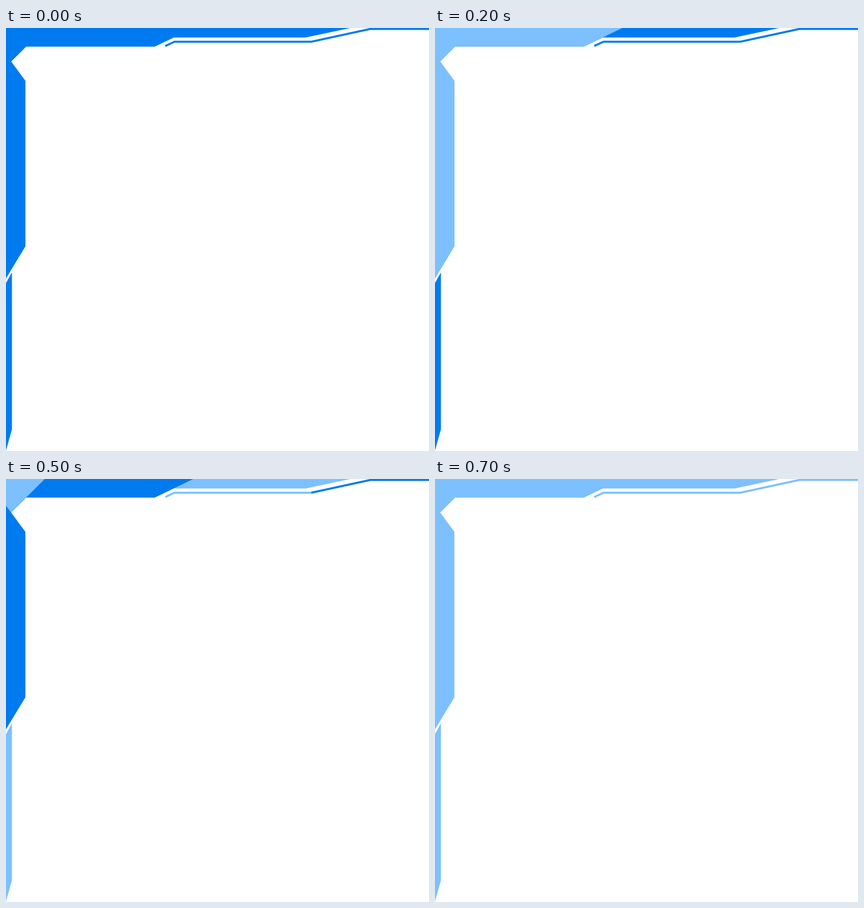
Recreate the animation shown at these times as an HTML page. Size 748 by 748 pixels, loop 800 ms.

```html
<!DOCTYPE html>
<html lang="en">
<head>
<meta charset="utf-8">
<title>Pulsing frame corner</title>
<style>
  html, body { margin: 0; width: 100%; height: 100%; overflow: hidden; background: #fff; }
  svg { display: block; width: 100%; height: 100%; }
</style>
</head>
<body>
<svg id="stage" viewBox="0 0 748 748">
  <clipPath id="frame">
    <path d="M0 0H609L530 16.8H296.8L263.4 32.8H35.6L9 59.3L34.2 93.5V386L0 442.5Z
             M0 451L10.5 432V709.5L0 747Z"/>
  </clipPath>
  <!-- Nested zones, outermost first; the clip gives them their shared outline. -->
  <g id="zones" clip-path="url(#frame)">
    <path d="M0 0H748V748H0Z"/>
    <path d="M0 0H331L263 33L34 391L0 447Z"/>
    <path d="M0 0H68.5L9 59.3L0 47.3Z"/>
  </g>
  <g fill="none" stroke-width="3.6" stroke-miterlimit="10">
    <polyline id="spent"/>
    <polyline id="ahead"/>
  </g>
</svg>
<script>
const STEP = 100, STEPS = 8, REPEAT = 4;
const DARK = '#007bef', LIGHT = '#7dc0ff';
const rail = [[281.6, 31.9], [298, 24.2], [540, 24.2], [644, 1.7], [748, 1.7]];

const byId = id => document.getElementById(id);
const zones = [...byId('zones').children].reverse();
const spent = byId('spent'), ahead = byId('ahead');
spent.setAttribute('stroke', LIGHT);
ahead.setAttribute('stroke', DARK);

function draw(time) {
  const step = Math.floor(time / STEP) % STEPS;

  // The fade spreads from the corner; a second pulse follows it.
  zones.forEach((zone, i) => {
    const lit = step <= i || step === i + REPEAT;
    zone.setAttribute('fill', lit ? DARK : LIGHT);
  });

  // Then it runs along the rail, one segment per step.
  const head = Math.max(0, step - zones.length);
  spent.setAttribute('points', rail.slice(0, head + 1).join(' '));
  ahead.setAttribute('points', rail.slice(head).join(' '));
}

const start = performance.now();
function tick() {
  draw(performance.now() - start);
  requestAnimationFrame(tick);
}
tick();
</script>
</body>
</html>
```
